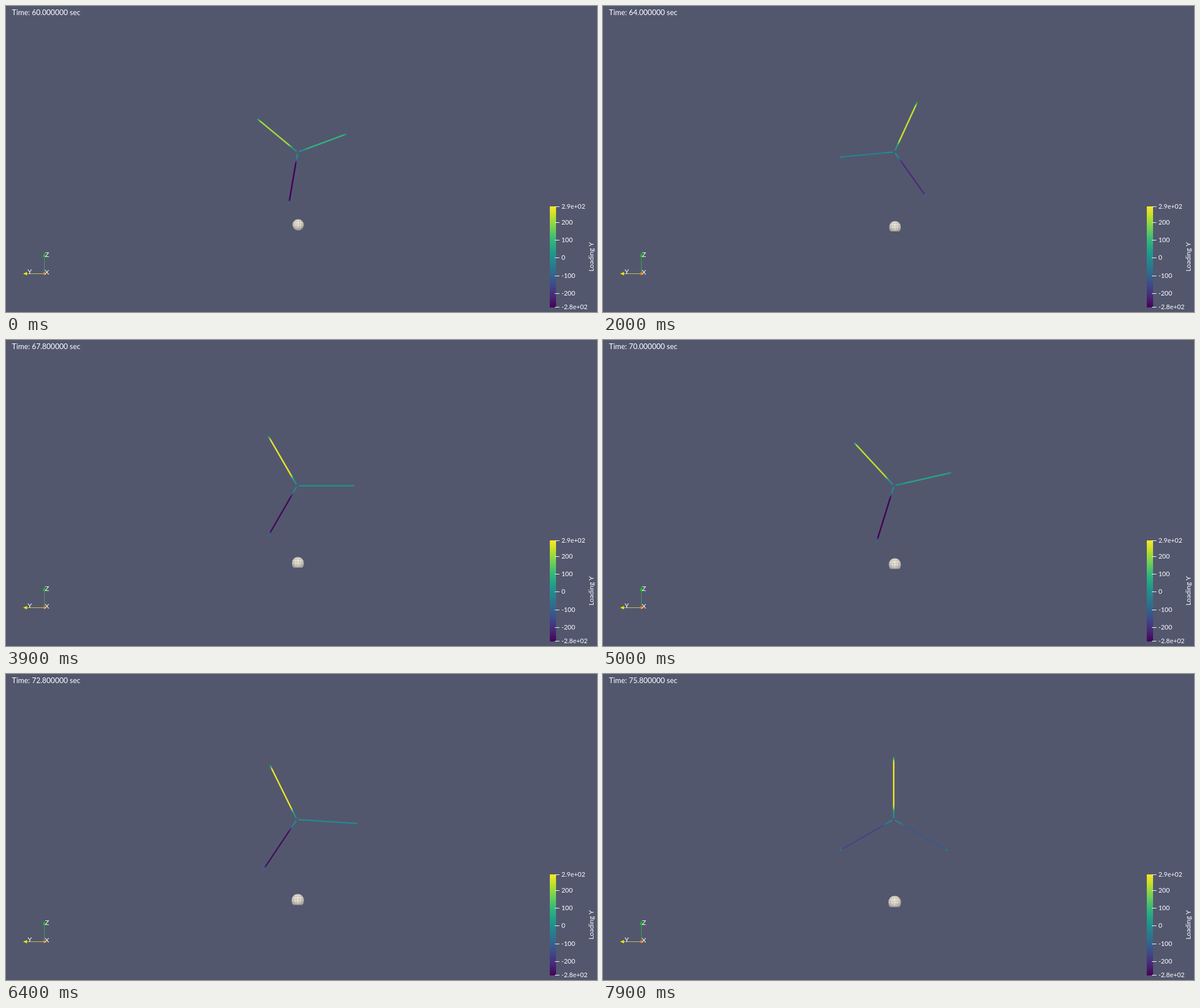
An HTML page with a canvas that plays this animation: 1039x539 px, repeating every 8 s.

```html
<!DOCTYPE html>
<html lang="en">
<head>
<meta charset="utf-8">
<title>Rotor loading</title>
<style>
  html, body { margin: 0; width: 100%; height: 100%; overflow: hidden; background: #52576e; }
  canvas { display: block; }
</style>
</head>
<body>
<canvas id="stage" width="1039" height="539"></canvas>
<script>
const ctx = document.getElementById('stage').getContext('2d');
const W = 1039, H = 539;
const LOOP = 8000, STEP = 100;
const RAD = Math.PI / 180;
const FONT = 'Lato, "Open Sans", sans-serif';
const VIRIDIS = [
  [68, 1, 84], [72, 40, 120], [62, 73, 137], [49, 104, 142], [38, 130, 142],
  [31, 158, 137], [53, 183, 121], [110, 206, 88], [181, 222, 43], [253, 231, 37]
];

function loadColor(value) {
  const t = Math.min(1, Math.max(0, (value + 280) / 570)) * (VIRIDIS.length - 1);
  const i = Math.min(VIRIDIS.length - 2, Math.floor(t));
  const mix = VIRIDIS[i].map((c, n) => Math.round(c + (VIRIDIS[i + 1][n] - c) * (t - i)));
  return `rgb(${mix})`;
}

function line(x1, y1, x2, y2, color, width) {
  ctx.strokeStyle = color;
  ctx.lineWidth = width;
  ctx.beginPath();
  ctx.moveTo(x1, y1);
  ctx.lineTo(x2, y2);
  ctx.stroke();
}

function label(text, x, y, size) {
  ctx.fillStyle = '#fff';
  ctx.font = `${size}px ${FONT}`;
  ctx.fillText(text, x, y);
}

function triangle(points, color) {
  ctx.fillStyle = color;
  ctx.beginPath();
  points.forEach(([x, y]) => ctx.lineTo(x, y));
  ctx.fill();
}

// Angles are clockwise degrees from straight up.
function drawBlade(cx, cy, radius, angle) {
  const a = angle * RAD, sx = Math.sin(a), sy = -Math.cos(a);
  const load = 285 * Math.cos(a) - 25 * Math.sin(2 * a);
  const at = r => [cx + sx * r, cy + sy * r];
  const root = at(3.5), tip = at(radius);
  const fill = ctx.createLinearGradient(...root, ...tip);
  const stops = [[0, 0], [0.08, 0.06], [0.125, 0.3], [0.15, 0.65], [0.19, 0.94],
    [0.23, 1], [0.92, 1], [0.955, 0.8], [0.975, 0.4], [1, 0.25]];
  stops.forEach(([p, f]) => fill.addColorStop(p, loadColor(load * f)));
  const dip = c => Math.exp(-(((angle - c) / 20) ** 2));
  ctx.lineCap = 'round';
  line(...root, ...tip, fill, 2.6 - 0.7 * (dip(120) + dip(240)));
  ctx.lineCap = 'butt';
}

function drawRotor(k) {
  const cx = 512.7 - 0.021 * k, cy = 257.4 - 0.016 * k;
  const radius = 90.8 + 0.225 * k;
  for (let b = 0; b < 3; b++) {
    drawBlade(cx, cy, radius, (69.6 + 9.752 * k + 120 * b) % 360);
  }
}

function drawBall(k) {
  const r = 9.9 + 0.014 * k, x = 513.6 - 0.01 * k;
  const top = 375.5 + 0.155 * k + 0.0005 * k * k, y = top + r;
  const shade = ctx.createRadialGradient(x - 1, y - r * 0.45, 0, x, y - r * 0.2, r * 1.3);
  shade.addColorStop(0, '#efe9dc');
  shade.addColorStop(0.5, '#ddd7ca');
  shade.addColorStop(1, '#96938e');
  ctx.save();
  ctx.beginPath();
  if (k === 0) {
    ctx.arc(x, y, r, 0, 2 * Math.PI);
  } else {
    const low = y + r * 0.78;
    ctx.arc(x, y, r, Math.PI, 0);
    ctx.quadraticCurveTo(x + r, low - 2, x + r * 0.72, low);
    ctx.lineTo(x - r * 0.72, low);
    ctx.quadraticCurveTo(x - r, low - 2, x - r, y);
  }
  ctx.fillStyle = shade;
  ctx.fill();
  ctx.clip();
  ctx.strokeStyle = 'rgba(100,98,96,0.3)';
  ctx.lineWidth = 0.7;
  for (const f of [0.25, 0.65]) {
    ctx.beginPath();
    ctx.ellipse(x, y, r * f, r, 0, 0, 2 * Math.PI);
    ctx.stroke();
  }
  for (const f of [-0.6, -0.15, 0.3, 0.65]) {
    line(x - r, y + r * f, x + r, y + r * f, 'rgba(100,98,96,0.3)', 0.7);
  }
  ctx.restore();
}

function drawAxes() {
  line(67.5, 471, 67.5, 441, '#48a052', 1);
  line(37, 471.5, 67, 471.5, '#c9c94a', 1);
  triangle([[67.5, 434.5], [70.5, 442], [64.5, 442]], '#14c414');
  triangle([[30, 471.5], [37, 468.5], [37, 474.5]], '#e6e600');
  ctx.fillStyle = '#ef7d1c';
  ctx.beginPath();
  ctx.arc(67.5, 471.5, 2.4, 0, 2 * Math.PI);
  ctx.fill();
  label('Z', 68.5, 442, 12);
  label('Y', 38, 472, 12);
  label('X', 68, 472.5, 12);
}

function drawLegend() {
  const top = 353, bottom = 531;
  const bar = ctx.createLinearGradient(0, bottom, 0, top);
  VIRIDIS.forEach((c, i) => bar.addColorStop(i / (VIRIDIS.length - 1), `rgb(${c})`));
  ctx.fillStyle = bar;
  ctx.fillRect(956, top, 11, bottom - top);
  const ticks = [['2.9e+02', 353.5], ['200', 381.5], ['100', 412.5], ['0', 443.5],
    ['-100', 475.5], ['-200', 506.5], ['-2.8e+02', 530.5]];
  for (const [text, y] of ticks) {
    line(965, y, 973, y, '#fff', 1);
    label(text, 976.5, y + 3.5, 11.4);
  }
  ctx.save();
  ctx.translate(1033, 467.5);
  ctx.rotate(-Math.PI / 2);
  label('Loading Y', 0, 0, 12);
  ctx.restore();
}

function draw(now) {
  const k = Math.floor((now % LOOP) / STEP);
  ctx.fillStyle = '#52576e';
  ctx.fillRect(0, 0, W, H);
  label(`Time: ${(60 + k * 0.2).toFixed(6)} sec`, 10.5, 16, 13);
  drawRotor(k);
  drawBall(k);
  drawAxes();
  drawLegend();
}

const start = performance.now();
function frame() {
  draw(performance.now() - start);
  requestAnimationFrame(frame);
}
frame();
</script>
</body>
</html>
```
